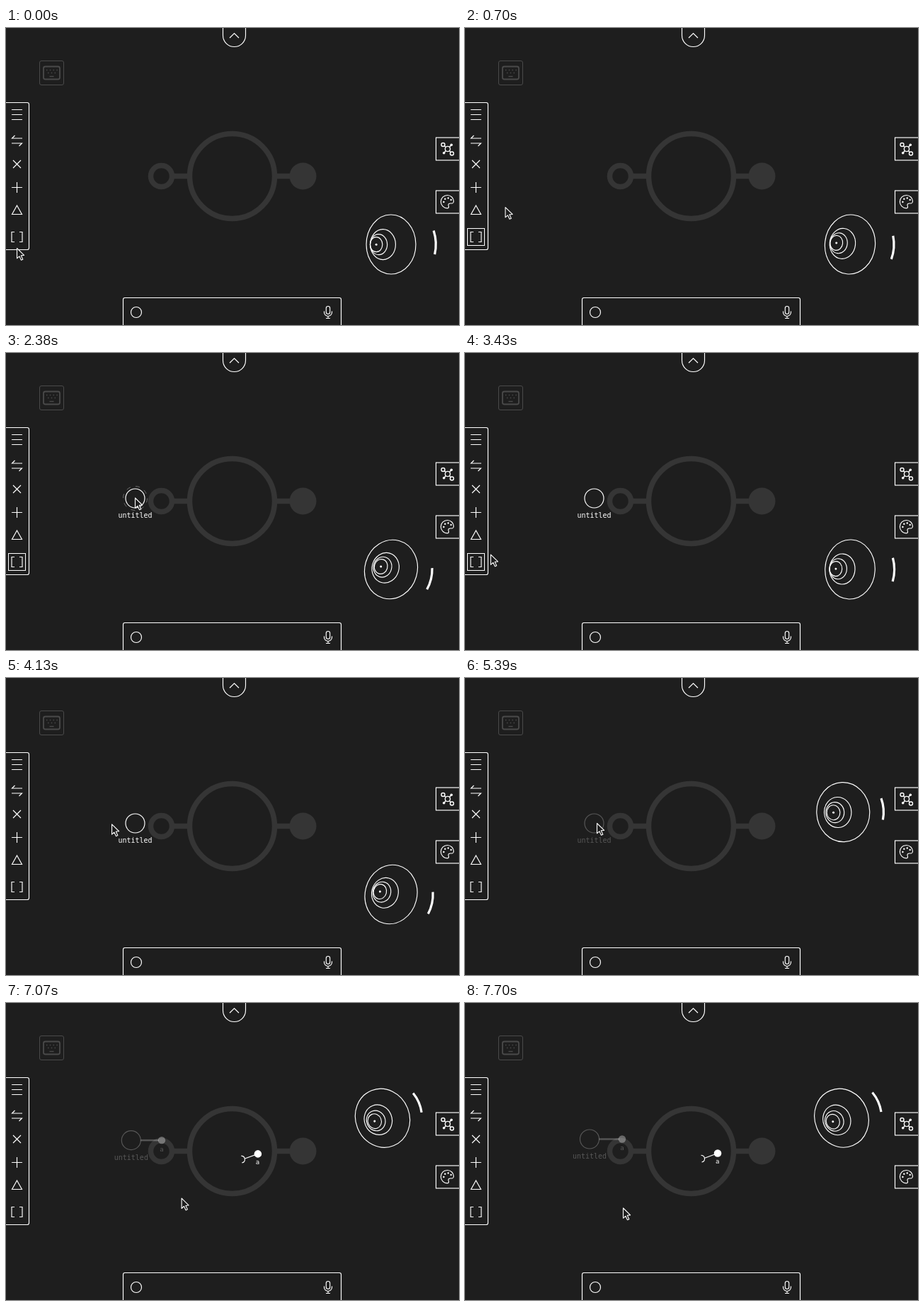
An HTML page that plays this animation: 640 by 420 pixels, repeating every 8 s.

```html
<!DOCTYPE html>
<html lang="en">
<head>
<meta charset="utf-8">
<title>Graph editor</title>
<style>
  html, body { margin: 0; width: 100%; height: 100%; overflow: hidden; background: #1e1e1e; }
  svg { display: block; width: 640px; height: 420px; }
  .line { fill: none; stroke: #fff; stroke-width: 1.15; }
  .dim { fill: none; stroke: #4a4a4a; }
  .solid { fill: #fff; stroke: none; }
  text { font: 10px "DejaVu Sans Mono", monospace; fill: #fff; text-anchor: middle; }
  text.small { font-size: 9px; }
</style>
</head>
<body>
<svg viewBox="0 0 640 420">
  <rect width="640" height="420" fill="#1e1e1e"/>

  <g fill="none" stroke="#353535" stroke-width="7.5">
    <circle cx="319.5" cy="209.5" r="60"/>
    <circle cx="219.5" cy="209.5" r="15"/>
    <path d="M237 209.5H257M382 209.5H402"/>
    <circle cx="419.5" cy="209.5" r="19" fill="#353535" stroke="none"/>
  </g>

  <g class="dim">
    <rect x="47.5" y="46.5" width="34" height="34" rx="2.5"/>
    <rect x="53" y="54.5" width="23" height="18" rx="2.5" stroke-width="1.8"/>
    <path d="M57 59.5H73M59 63.5H71" stroke-width="1.4" stroke-dasharray="1.4 3.4"/>
    <path d="M61.5 68.5H67.5" stroke-width="1.4"/>
  </g>

  <g class="line">
    <path d="M306.5 -2V10.5A16 16 0 0 0 338.5 10.5V-2M316 14L322.5 7.5L329 14"/>
    <rect x="-6" y="105.5" width="38.5" height="208" rx="2.5"/>
    <path d="M8 115.5H23M8 122.5H23M8 129.5H23"/>
    <path d="M12.5 152L8.5 156H23M8 163H22.5L18.5 167"/>
    <path d="M10 187L21 198M21 187L10 198M15.5 218V233M8 225.5H23"/>
    <path d="M15.5 251L22.5 263.5H8.5Z"/>
    <path d="M12 288.5H8V302.5H12M19 288.5H23V302.5H19"/>
    <rect id="pick" x="3.5" y="283.5" width="24" height="24" stroke-width="1"/>

    <rect x="607.5" y="155" width="40" height="32"/>
    <g transform="translate(624 171)" stroke-width="1.4">
      <circle r="3.6"/>
      <circle cx="-6.5" cy="-6" r="2.5"/>
      <circle cx="6" cy="6.5" r="2.5"/>
      <path d="M-4.6 -4.3L-2.6 -2.5M2.5 2.6L4.3 4.7M2.6 -2.5L5 -5.5M-2.6 2.5L-5 5.5"/>
      <circle class="solid" cx="5.3" cy="-5.7" r="1.8"/>
      <circle class="solid" cx="-5.3" cy="5.7" r="1.8"/>
    </g>
    <rect x="607.5" y="230" width="40" height="32"/>
    <path d="M623.5 236.5A9 9 0 0 0 623.5 254.8C626.5 254.8 625.3 252 625 250.5C624.8 248.5 626.5 248 628 248H630.5Q632.5 247.5 632.5 245A9 8.7 0 0 0 623.5 236.5Z"/>
    <g id="paints" class="solid"></g>

    <rect x="165.5" y="381.5" width="308" height="50" rx="2.5"/>
    <circle cx="184" cy="402" r="7.5"/>
    <rect x="452.3" y="393.5" width="5.4" height="11" rx="2.7"/>
    <path d="M449.5 400.5V402A5.5 5.5 0 0 0 460.5 402V400.5M455 407.5V410.5M452 410.5H458"/>
  </g>

  <g id="node">
    <circle class="line" r="13.5"/>
    <text y="27.5">untitled</text>
  </g>
  <circle id="halo" class="line" r="17" stroke-dasharray="6 7.35" style="stroke:#6c6c6c;stroke-width:1"/>
  <circle id="ripple" class="line" cx="182.5" cy="205.5" style="stroke-width:1"/>

  <g id="child">
    <path id="link" stroke="#fff" stroke-width="2.5" opacity=".24"/>
    <g id="leaf">
      <circle class="solid" r="5.2" opacity=".33"/>
      <text class="small" y="15.5" opacity=".25">a</text>
    </g>
  </g>
  <g id="branch">
    <path class="line" d="M357 212.5L338.7 219.2M333.5 215.3C340 216 340 224 334.5 225"/>
    <circle class="solid" cx="357" cy="212.5" r="5.3"/>
    <text class="small" x="356.7" y="227.3">a</text>
  </g>

  <g id="target" class="line">
    <path id="beam" style="stroke-width:2.2" stroke-dasharray="2.2 2.2"/>
    <g stroke-width=".75" opacity=".85">
      <circle cx="337" cy="226" r="22.6"/>
      <circle cx="337" cy="226" r="20.5"/>
    </g>
  </g>

  <g id="eye" class="line">
    <circle class="solid" r="1.5"/>
    <path style="stroke-width:3.2"/>
  </g>
  <path id="cursor" fill="#1e1e1e" stroke="#fff" stroke-width="1.1" stroke-linejoin="round"
    d="M.5 .5V14.8L3.8 11.8L6.5 17.3L8.8 16.2L6.3 10.8L10.6 10.4Z"/>
</svg>
<script>
const LOOP = 8000, STEP = 70;
const $ = id => document.getElementById(id);
const set = (el, attrs) => { for (const k in attrs) el.setAttribute(k, attrs[k]); };
const show = (el, on) => { el.style.display = on ? '' : 'none'; };
const lerp = (a, b, p) => a + (b - a) * p;
const span = (t, a, b) => Math.min(1, Math.max(0, (t - a) / (b - a)));
const easeOut = (p, n = 3) => 1 - (1 - p) ** n;
const polar = (r, deg) => [r * Math.cos(deg * Math.PI / 180), r * Math.sin(deg * Math.PI / 180)];

function add(parent, tag, attrs) {
  const el = document.createElementNS('http://www.w3.org/2000/svg', tag);
  set(el, attrs);
  return parent.appendChild(el);
}

// Each move glides to a point, bowing upwards by `lift` on the way.
const button = { x: 15, y: 296 };
const moves = [
  { from: 0, to: 560, ...button },
  { from: 630, to: 1400, x: 182, y: 204.5, lift: 27 },
  { from: 3010, to: 3850, ...button },
  { from: 3850, to: 4550, x: 186, y: 205, lift: 27 },
  { from: 5740, to: 6370, x: 337, y: 225.5 },
  { from: 6650, to: 7700, x: 223, y: 289.5 }
];

function pointer(t) {
  let x = 15, y = 311;
  for (const m of moves) {
    const e = easeOut(span(t, m.from, m.to));
    x = lerp(x, m.x, e);
    y = lerp(y, m.y, e) - 4 * e * (1 - e) * (m.lift || 0);
  }
  return [x, y];
}

for (let i = 0; i < 4; i++) {
  const [x, y] = polar(5.6, 180 + 49 * i);
  add($('paints'), 'circle', { cx: 624 + x, cy: 246 + y, r: 1.2 });
}

// Nested rings slide towards the pointer and flatten with its distance.
const eye = $('eye'), dot = eye.querySelector('circle'), arc = eye.querySelector('path');
const rings = [[42, 0], [21.5, .0217], [14.5, .033], [10.5, .0395]]
  .map(([r, slide]) => ({ r, slide, el: add(eye, 'ellipse', { ry: r }) }));

function drawEye(ex, ey, cx, cy) {
  const d = Math.hypot(ex - cx, ey - cy), a = Math.atan2(ey - cy, ex - cx) * 180 / Math.PI;
  set(eye, { transform: `translate(${ex} ${ey}) rotate(${a})` });
  for (const { r, slide, el } of rings) set(el, { cx: -slide * d, rx: r * (1.007 - d * .00033) });
  set(dot, { cx: -.0395 * d });
  const R = 45.3 + .034 * d;
  set(arc, { d: `M${polar(R, -17.5)}A${R} ${R} 0 0 1 ${polar(R, 13.5)}` });
  const [dx, dy] = polar(.0395 * d, a);
  return [ex - dx, ey - dy];
}

function drawRipple(t) {
  const [a, b, size] = t < 3000 ? [1750, 1890, 61] : [4900, 5180, 72.5];
  const p = span(t, a, b);
  show($('ripple'), t >= a && t <= b);
  set($('ripple'), { r: lerp(20, size, p), opacity: lerp(.7, .2, p) });
}

function draw(t) {
  const [cx, cy] = pointer(t);
  const jump = easeOut(span(t, 5320, 5525), 4);
  set($('cursor'), { transform: `translate(${cx} ${cy})` });
  const pupil = drawEye(lerp(544, 532, jump), lerp(306, 162.7, jump), cx, cy);

  show($('pick'), t >= 350 && t < 3780);
  drawRipple(t);

  const p = easeOut(span(t, 6650, 7490));
  const nx = lerp(182.5, 176, p), ny = lerp(205.5, 192.5, p);
  show($('node'), t >= 1750);
  set($('node'), { transform: `translate(${nx} ${ny})`, opacity: lerp(1, .25, span(t, 4830, 5250)) });
  set($('halo'), { cx: nx, cy: ny });
  show($('halo'), t >= 1820 && t < 4900 && Math.hypot(cx - nx, cy - ny) < 18);

  show($('target'), t >= 6300 && t < 6720);
  set($('beam'), { d: `M337 226L${pupil}` });

  const made = t >= 6720, lx = lerp(206, 222, p);
  show($('child'), made);
  show($('branch'), made);
  set($('leaf'), { transform: `translate(${lx} ${ny})` });
  set($('link'), { d: `M${nx + 13.5} ${ny}H${lx - 4}` });
  set($('branch'), { transform: `translate(${lerp(-9, 0, p)} ${lerp(7, 0, p)})` });
}

const start = performance.now();
function tick() {
  const t = (performance.now() - start) % LOOP;
  draw(Math.floor(t / STEP) * STEP);
  requestAnimationFrame(tick);
}
tick();
</script>
</body>
</html>
```
